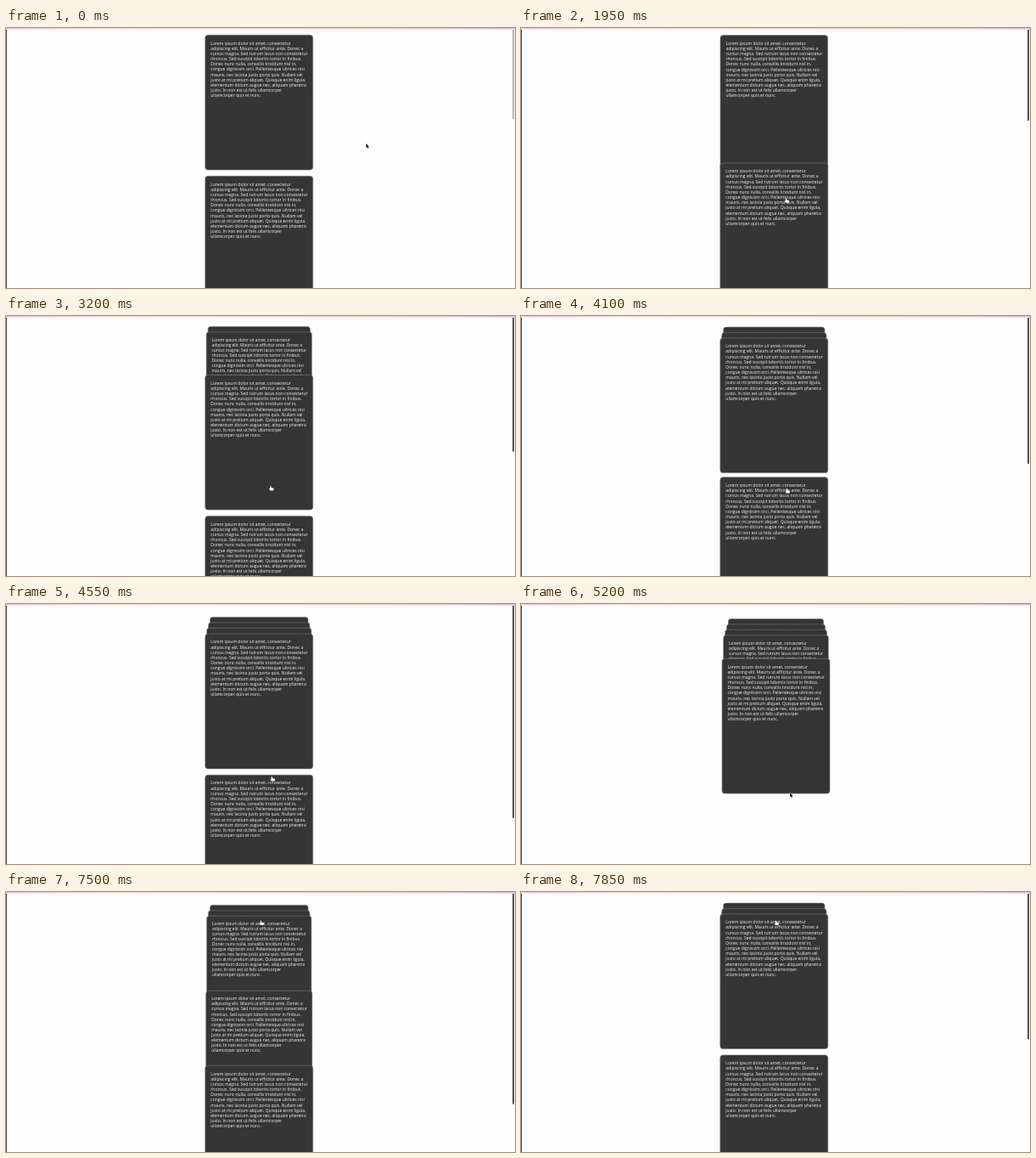
Recreate the animation shown at these times as an HTML page with a canvas. Size 600 px wide and 306 px high, loop 8000 ms.

```html
<!DOCTYPE html>
<html>
<head>
<meta charset="utf-8">
<style>
  html, body { margin: 0; width: 100%; height: 100%; overflow: hidden; background: #fdfdfd; }
  canvas { display: block; }
</style>
</head>
<body>
<canvas id="stage" width="600" height="306"></canvas>
<script>
const ctx = document.getElementById('stage').getContext('2d');
const LOOP = 8000;
const CARDS = 5, WIDTH = 127, HEIGHT = 158.7, TOP = 8.3;
const PITCH = 166, PEEK = 8.8, SHRINK = 0.03;
const LINES = `Lorem ipsum dolor sit amet, consectetur
adipiscing elit. Mauris ut efficitur ante. Donec a
cursus magna. Sed rutrum lacus non consectetur
rhoncus. Sed suscipit lobortis tortor in finibus.
Donec nunc nulla, convallis tincidunt nisl in,
congue dignissim orci. Pellentesque ultrices nisi
mauris, nec lacinia justo porta quis. Nullam vel
justo at mi pretium aliquet. Quisque enim ligula,
elementum dictum augue nec, aliquam pharetra
justo. In non est ut felis ullamcorper
ullamcorper quis et nunc.`.split('\n');

// Each click makes another card the active one.
const clicks = [
  { at: 1900, ms: 500, from: 0, to: 1 },
  { at: 3001, ms: 465, from: 1, to: 2 },
  { at: 4088, ms: 500, from: 2, to: 3 },
  { at: 4905, ms: 515, from: 3, to: 4 },
  { at: 7353, ms: 495, from: 4, to: 2 },
];

// Pointer path: time, x, y
const pointerPath = [
  [0, 424.5, 136], [400, 424.5, 136], [500, 421, 134], [850, 345, 159],
  [1100, 345, 159], [1400, 312, 199.6],
  [1690, 312, 199.6], [1700, 312.5, 200.2],
  [2690, 312.5, 200.2], [2700, 312, 199.8],
  [3600, 312, 199.8], [3750, 313.4, 203],
  [4960, 313.4, 203], [5200, 317, 222.3], [5350, 316.5, 228],
  [5600, 316.5, 228], [5950, 307, 87.5],
  [6150, 307, 87.5], [6400, 316, 66], [6800, 300.5, 33.5], [LOOP, 300.5, 33.5],
];

const mix = (a, b, p) => a + (b - a) * p;
const clamp = p => Math.min(1, Math.max(0, p));

// The CSS "ease" curve, cubic-bezier(.25, .1, .25, 1)
function ease(x) {
  if (x <= 0 || x >= 1) return clamp(x);
  const bezier = (a, b, u) => 3 * u * (1 - u) * ((1 - u) * a + u * b) + u ** 3;
  let lo = 0, hi = 1;
  for (let i = 0; i < 24; i++) {
    const mid = (lo + hi) / 2;
    if (bezier(0.25, 0.25, mid) < x) lo = mid; else hi = mid;
  }
  return bezier(0.1, 1, lo);
}

function pose(i, active) {
  return {
    y: TOP + (i <= active ? PEEK * i : PITCH * i - (PITCH - PEEK) * active),
    scale: 1 - SHRINK * Math.max(0, active - i),
  };
}

function cardsAt(t) {
  const click = clicks.filter(c => c.at <= t).pop() || clicks[0];
  const p = ease((t - click.at) / click.ms);
  return Array.from({ length: CARDS }, (_, i) => {
    const a = pose(i, click.from), b = pose(i, click.to);
    return { y: mix(a.y, b.y, p), scale: mix(a.scale, b.scale, p) };
  });
}

function pointerAt(t) {
  const k = pointerPath.findIndex(point => point[0] > t);
  const [t0, x0, y0] = pointerPath[k - 1], [t1, x1, y1] = pointerPath[k];
  const u = (t - t0) / (t1 - t0), p = u * u * (3 - 2 * u);
  return { x: mix(x0, x1, p), y: mix(y0, y1, p) };
}

function drawCard({ y, scale }, center) {
  ctx.save();
  ctx.translate(center, y + HEIGHT / 2);
  ctx.scale(scale, scale);
  ctx.translate(-WIDTH / 2, -HEIGHT / 2);
  ctx.beginPath();
  ctx.roundRect(0, 0, WIDTH, HEIGHT, 3.4);
  ctx.fillStyle = '#353535';
  ctx.fill();
  ctx.lineWidth = 0.6;
  ctx.strokeStyle = '#777';
  ctx.stroke();
  ctx.fillStyle = '#f4f4f4';
  ctx.scale(0.25, 0.25);
  ctx.font = '20px "Open Sans", "Noto Sans", sans-serif';
  LINES.forEach((line, i) => ctx.fillText(line, 26, 45 + 24.7 * i));
  ctx.restore();
}

function drawPointer({ x, y }, hand) {
  ctx.save();
  ctx.translate(x, y);
  ctx.lineJoin = 'round';
  const shape = new Path2D(hand
    ? 'M-.7 .5Q0-.3 .6 .5V2.1L3 2.6Q3.8 2.8 3.6 3.6L3 5.6H-.4L-2 3.6Q-1.8 2.8-.7 3.4Z'
    : 'M0 0V5L1.2 4L2 6L2.9 5.6L2.1 3.7H3.7Z');
  ctx.lineWidth = hand ? 0.5 : 0.7;
  ctx.strokeStyle = hand ? '#222' : '#fff';
  ctx.fillStyle = hand ? '#fff' : '#111';
  ctx.stroke(shape);
  ctx.fill(shape);
  ctx.restore();
}

function drawFrame(t) {
  ctx.fillStyle = '#fdfdfd';
  ctx.fillRect(0, 0, 600, 306);

  const cards = cardsAt(t);
  const scrolled = pose(CARDS - 1, 0).y - cards[CARDS - 1].y;
  const contentHeight = 812.6 - scrolled;
  const overflows = contentHeight > 292;
  const center = overflows ? 298.3 : 300.5;
  cards.forEach(card => drawCard(card, center));

  if (overflows) {
    const idle = t < 100;
    ctx.fillStyle = idle ? '#b5b5b5' : '#505050';
    ctx.fillRect(597, 2, 2, 85300 / contentHeight);
  }

  const strip = ctx.createLinearGradient(0, 0, 600, 0);
  ['#ecc8dc', '#fbdcd2', '#fcd3c4', '#fbcdbf', '#dfb9ec']
    .forEach((color, i) => strip.addColorStop(i / 4, color));
  ctx.fillStyle = strip;
  ctx.fillRect(0, 0, 600, 1.5);
  ctx.fillStyle = '#484848';
  ctx.fillRect(0, 2, 1, 304);

  const pointer = pointerAt(t);
  const hand = cards.some(({ y, scale }) =>
    Math.abs(pointer.x - center) < WIDTH / 2 * scale &&
    Math.abs(pointer.y - y - HEIGHT / 2) < HEIGHT / 2 * scale - 1.5);
  drawPointer(pointer, hand);
}

function tick() {
  drawFrame(performance.now() % LOOP);
  requestAnimationFrame(tick);
}
tick();
</script>
</body>
</html>
```
